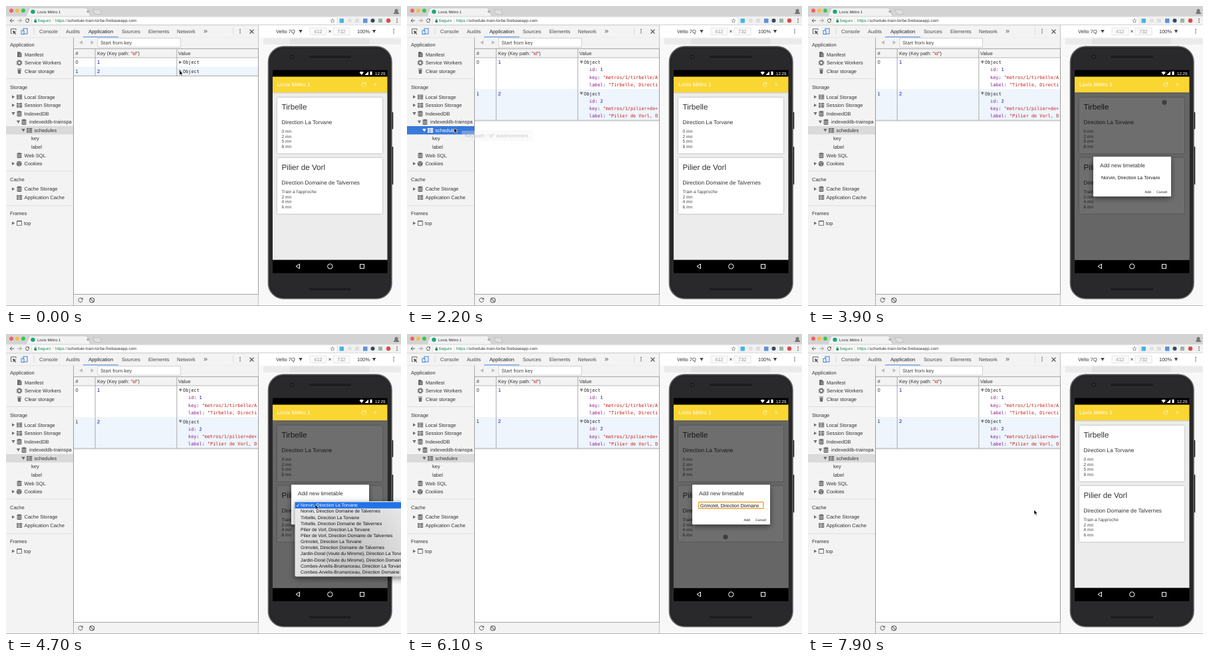
Recreate the animation shown at these times as an HTML page. Size 594 px wide and 452 px high, loop 8 s.

```html
<!DOCTYPE html>
<html lang="en">
<head>
<meta charset="utf-8">
<title>Timetable storage</title>
<style>
html,body{margin:0;width:100%;height:100%;overflow:hidden;background:#fff}
svg{display:block;width:100%;height:100%}
text{font-family:"Liberation Sans",Arial,sans-serif;white-space:pre;text-rendering:geometricPrecision}
.mono{font-family:"DejaVu Sans Mono",monospace}
.soft{filter:drop-shadow(0 .8px 1px rgba(0,0,0,.35))}
.deep{filter:drop-shadow(0 3px 4px rgba(0,0,0,.5))}
.a{animation:8s linear infinite}
.s{animation:8s step-end infinite}
.tri{transform-box:fill-box;transform-origin:center}
.open0{animation-name:open0}
.open1{animation-name:open1}
.row1{animation-name:row1}
.end{animation-name:end}
.pick{animation-name:pick}
.pickbg{animation-name:pickbg}
.tip{animation-name:tip}
.move{animation-name:move}
.arrow{animation-name:arrow}
.touch{animation-name:touch}
.press{animation-name:press}
.modal{animation-name:modal}
.focus{animation-name:focus}
.menu{animation-name:menu}
.old{animation-name:old}
.new{animation-name:new}
.hot{animation-name:hot}
@keyframes open0{0%{transform:none}11.25%,100%{transform:rotate(90deg)}}
@keyframes open1{0%{transform:none}1.25%,100%{transform:rotate(90deg)}}
@keyframes row1{0%{transform:none}11.25%,100%{transform:translateY(33.7px)}}
@keyframes end{0%{transform:none}1.25%{transform:translateY(33.7px)}11.25%,100%{transform:translateY(67.4px)}}
@keyframes pick{0%{color:#6e6e6e;fill:#333}26.25%{color:#fff;fill:#fff}35%,100%{color:#6e6e6e;fill:#333}}
@keyframes pickbg{0%{fill:#dadada}26.25%{fill:#3879d9}35%,100%{fill:#dadada}}
@keyframes tip{0%,22.5%{opacity:0}23.75%,26.25%{opacity:1}28.1%,100%{opacity:0}}
@keyframes move{
0%,5%{transform:translate(261px,97px)}
10%,15%{transform:translate(261px,84px)}
23.75%,28.75%{transform:translate(71px,184px)}
36.25%,37.5%{transform:translate(306px,307px)}
45%,47.5%{transform:translate(556px,119px)}
48.75%{transform:translate(536px,145px)}
53.75%,62.5%{transform:translate(465px,257px)}
67.5%,73.75%{transform:translate(462px,319px)}
81.25%,95%{transform:translate(512.5px,280px)}
98.75%,100%{transform:translate(340px,265px)}}
@keyframes arrow{0%{opacity:1}40.3%{opacity:0}58.75%{opacity:1}73.75%{opacity:0}97.4%,100%{opacity:1}}
@keyframes touch{0%{opacity:0}40.3%{opacity:1}58.75%{opacity:0}73.75%{opacity:1}97.4%,100%{opacity:0}}
@keyframes press{0%{opacity:0}45%{opacity:1}47.5%,100%{opacity:0}}
@keyframes modal{0%,47.2%{opacity:0}48.6%,93.7%{opacity:1}95%,100%{opacity:0}}
@keyframes focus{0%{opacity:0}58.75%{opacity:1}95%,100%{opacity:0}}
@keyframes menu{0%{opacity:0}58.75%{opacity:1}73.75%,100%{opacity:0}}
@keyframes old{0%{opacity:1}73.75%,100%{opacity:0}}
@keyframes new{0%{opacity:0}73.75%,100%{opacity:1}}
@keyframes hot{0%,62.5%{transform:none;animation-timing-function:steps(7)}67.5%,100%{transform:translateY(64.05px)}}
</style>
</head>
<body>
<script>
const rect = (x, y, w, h, fill, more = '') =>
  `<rect x="${x}" y="${y}" width="${w}" height="${h}" fill="${fill}" ${more}/>`;
const dot = (x, y, r, fill, more = '') => `<circle cx="${x}" cy="${y}" r="${r}" fill="${fill}" ${more}/>`;
const path = (d, fill, more = '') => `<path d="${d}" fill="${fill}" ${more}/>`;
const line = (d, color, w = 1) => `<path d="${d}" fill="none" stroke="${color}" stroke-width="${w}"/>`;
// y is the middle of the line of text
const text = (x, y, s, size = 7.5, fill = '#333', more = '') =>
  `<text x="${x}" y="${y + size * .355}" font-size="${size}" fill="${fill}" ${more}>${s}</text>`;
const group = (cls, body, more = '') => `<g class="${cls}" ${more}>${body}</g>`;
const at = (x, y, body) => `<g transform="translate(${x} ${y})">${body}</g>`;
const down = (x, y, c = '#6e6e6e') => path(`M${x - 2.7} ${y - 2.2}h5.4l-2.7 4.6z`, c);
const right = (x, y, c = '#6e6e6e', more = '') => path(`M${x - 2} ${y - 2.5}v5l4.2-2.5z`, c, more);
const reload = (x, y, c, r = 3) => at(x, y,
  line(`M${r * .8} ${-r * .6}A${r} ${r} 0 1 0 ${r} ${r * .2}`, c) +
  path(`M${r * 1.15} ${-r * 1.2}v${r}h${-r}z`, c));
const grid = (x, y, c = '#6e6e6e') => at(x, y,
  [-3.4, -.9, 1.6].map(v => rect(-4, v, 3.4, 1.9, c) + rect(0, v, 4.2, 1.9, c)).join(''));
const db = (x, y) => at(x, y,
  path('M-3.5-2.6a3.5 1.5 0 0 1 7 0v5.4a3.5 1.5 0 0 1-7 0z', '#6e6e6e') +
  line('M-3.5-1.8a3.5 1.4 0 0 0 7 0M-3.5.7a3.5 1.4 0 0 0 7 0', '#f3f3f3', .7));
const dots = (x, y) => [-2.6, 0, 2.6].map(d => dot(x, y + d, .8, '#555')).join('');

function browser() {
  let o = rect(0, 0, 594, 15, '#d3d3d3') + rect(0, 15, 594, 14, '#f1f1f1');
  ['#fc5b57', '#fdbc40', '#34c84a'].forEach((c, i) => o += dot(8 + i * 9, 7, 2.9, c));
  o += path('M30 15.2L35 4q.6-1 2-1h83q1.4 0 2 1l5 11.2z', '#f2f2f2', 'stroke="#b5b5b5" stroke-width=".5"');
  o += rect(0, 15, 594, .5, '#c4c4c4') + rect(31, 14.7, 95.5, 1, '#f2f2f2');
  o += path('M131 5.5h10l3 7h-10z', '#dedede', 'stroke="#aaa" stroke-width=".5"');
  o += dot(40.5, 8.6, 3.2, '#17a77a') + text(47, 8.6, 'Lovis Métro 1', 5.9);
  o += line('M121.5 7l3 3m0-3l-3 3', '#666', .8) + dot(587, 7, 2.6, '#777') + path('M583 12a4 3.5 0 0 1 8 0z', '#777');
  o += line('M12 22H6m2.7-2.7L6 22l2.7 2.7', '#555') + line('M17.5 22h6m-2.7-2.7l2.7 2.7-2.7 2.7', '#999');
  o += reload(32, 22, '#555', 2.6) + rect(39, 16.5, 459, 11.5, '#fff', 'rx="1.5" stroke="#ccc" stroke-width=".5"');
  o += rect(42.5, 21.5, 3.5, 3.2, '#0b8043') + line('M43.2 21.5v-1a1 1 0 0 1 2.1 0v1', '#0b8043', .7);
  o += text(47.5, 22, 'Seguro', 6.2, '#0b8043') + line('M70.5 18v8', '#ccc', .6);
  o += text(74, 22, '<tspan fill="#0b8043">https</tspan><tspan fill="#777">://</tspan>schedule-train-torbe.firebaseapp.com', 6.25);
  o += line('M491 19l.9 2.1 2.2.2-1.7 1.5.5 2.2-1.9-1.2-1.9 1.2.5-2.2-1.7-1.5 2.2-.2z', '#666', .6);
  o += rect(501.5, 19, 6.5, 6.5, '#45b5e5', 'rx="1"') + dot(517, 22, 3, '#e0e0e0') + rect(525, 19, 6, 6, '#dedede');
  o += rect(537, 19, 6.5, 6.5, '#5c93d8') + dot(551.5, 22, 3, '#34495e') + rect(560, 19, 6, 6, '#9bb5a6') + dot(575, 22, 3.2, '#d94b43');
  return o + dots(588, 22);
}

function tools() {
  let o = rect(0, 29, 380, 18, '#f3f3f3') + rect(0, 28.6, 594, .6, '#bbb') + rect(0, 47, 380, .7, '#c8c8c8');
  o += line('M9.5 41.5H7.5v-7h7.5v2', '#666') + path('M10 37l5.5 2-2.2 1 2 2.2-1 .8-2-2.2-1 1.9z', '#555');
  o += rect(26, 34, 6, 8, 'none', 'stroke="#3b7ddd"') + rect(23, 37, 4, 5.5, '#f3f3f3', 'stroke="#3b7ddd"');
  o += line('M42 33v10', '#ccc', .7);
  const tabs = { Console: 50, Audits: 90, Application: 124, Sources: 174, Elements: 214, Network: 257 };
  for (const t in tabs) o += text(tabs[t], 38.3, t, 7.6, t === 'Application' ? '#222' : '#4a4a4a');
  o += rect(116, 46.2, 53, 1.3, '#3b7ddd') + text(297, 37.5, '»', 11, '#555') + dots(352, 38);
  return o + line('M341.5 33v10', '#ccc', .6) + line('M366.5 35.5l6 6m0-6l-6 6', '#555', 1.1);
}

function sidebar() {
  let o = rect(0, 47.5, 102, 404, '#f3f3f3');
  [109, 248.5, 300.5].forEach(y => o += rect(0, y, 101, .7, '#d4d4d4'));
  const items = [[6, 58.5, 'Application'], [28, 73, 'Manifest'], [28, 85.5, 'Service Workers'], [28, 98.3, 'Clear storage'],
    [6, 122.5, 'Storage'], [27.5, 137, 'Local Storage'], [27.5, 149.6, 'Session Storage'], [27.5, 162.2, 'IndexedDB'],
    [35, 174.7, 'indexeddb-trainspa'], [38, 199.8, 'key'], [38, 212.4, 'label'], [27.5, 225, 'Web SQL'],
    [27.5, 237.6, 'Cookies'], [6, 261.2, 'Cache'], [27.5, 275.7, 'Cache Storage'], [27.5, 288.3, 'Application Cache'],
    [6, 312.5, 'Frames'], [27, 327.2, 'top']];
  items.forEach(([x, y, s]) => o += text(x, y, s));
  o += path('M17 69h4l2.5 2.5V77H17z', '#6e6e6e') + line('M20 73h2M20 75h2', '#f3f3f3', .5);
  o += dot(20, 85.5, 2.6, 'none', 'stroke="#6e6e6e" stroke-width="1.6"') +
    dot(20, 85.5, 3.9, 'none', 'stroke="#6e6e6e" stroke-width="1.2" stroke-dasharray="1.5 1.56"');
  o += path('M17.5 96h5l-.5 6h-4zM17 94.3h6v1h-6z', '#6e6e6e');
  [137, 149.6, 288.3].forEach(y => o += grid(20, y));
  [[20, 162.2], [27, 174.7], [20, 225], [20, 275.7]].forEach(p => o += db(...p));
  [137, 149.6, 237.6, 275.7, 327.2].forEach(y => o += right(11, y));
  o += down(11, 162.2) + down(18.5, 174.7);
  o += dot(19.7, 237.6, 3.9, '#6e6e6e') + dot(18, 236.5, .8, '#f3f3f3') + dot(21, 236, .7, '#f3f3f3') + dot(20, 239.5, .8, '#f3f3f3');
  o += rect(16.5, 324, 7, 6.5, 'none', 'stroke="#6e6e6e" stroke-width=".9"') + rect(16.5, 323.5, 7, 1.5, '#6e6e6e');
  o += rect(0, 181, 101.5, 12.5, '#dadada', 'class="s pickbg"');
  return o + group('s pick', down(26, 187.3, 'currentColor') + grid(35, 187.3, 'currentColor') + text(42.5, 187.3, 'schedules', 7.5, 'inherit'));
}

const mono = (x, y, s) => text(x, y, s, 6.87, '#222', 'class="mono"');
function record(n, key, label) {
  const field = (k, v, c) => `<tspan fill="#881391">${k}</tspan>: <tspan fill="${c}">${v}</tspan>`;
  return text(104.5, 6.6, n) + text(137, 6.6, n + 1, 7.5, '#1c00cf') +
    right(262.2, 6.8, '#6e6e6e', `class="tri s open${n}"`) + mono(266, 6.8, 'Object') +
    mono(274, 18, field('id', n + 1, '#1c00cf')) +
    mono(274, 29.3, field('key', '"metros/1/' + key, '#c41a16')) +
    mono(274, 40.6, field('label', '"' + label, '#c41a16'));
}

function table() {
  const cols = h => rect(133.6, 0, 1, h, '#aaa') + rect(256.4, 0, 1, h, '#aaa');
  let o = rect(101.5, 47.5, 279, 404, '#fff');
  o += at(0, 78, cols(48) + record(0, 'tirbelle/A', 'Tirbelle, Directi'));
  o += at(0, 91.3, group('s row1', rect(101.5, 0, 278, 48, '#eef5fd') + cols(48) + record(1, 'pilier+de+', 'Pilier de Vorl, D')));
  o += group('s end', rect(101.5, 105.2, 278, 400, '#fff') + rect(101.5, 104.8, 278, .9, '#999'));
  o += rect(101.5, 47.7, 278, 16.5, '#f3f3f3') + rect(138, 48.5, 124.5, 13.5, '#fff', 'stroke="#c4c4c4" stroke-width=".7"');
  o += path('M115 52v6l-5-3z', '#bbb') + path('M127.5 52v6l5-3z', '#bbb') + text(142, 55.3, 'Start from key', 7.6, '#444');
  o += rect(101.5, 64.5, 278, 13.5, '#f3f3f3') + at(0, 64.5, cols(13.5)) + rect(101.5, 77.5, 278, .8, '#aaa');
  o += text(104.5, 71.3, '#') + text(137, 71.3, 'Key (Key path: "<tspan fill="#c41a16">id</tspan>")', 7.4) + text(259, 71.3, 'Value');
  o += rect(101.5, 434, 278, 18, '#f3f3f3') + reload(112, 443, '#555', 3.2);
  o += line('M126.8 440.8l4.8 4.8', '#555', 1.1) + dot(129.2, 443.2, 3.5, 'none', 'stroke="#555" stroke-width="1.1"');
  return o + rect(101, 47.5, .8, 404, '#999');
}

function card(y, title, way, waits) {
  return group('soft', rect(408, y, 158, 84, '#fff', 'rx="1"')) +
    text(414.5, y + 14.3, title, 11.7) + text(414.5, y + 36.8, way, 8.3) +
    waits.map((s, i) => text(414.5, y + 51 + i * 7.5, s, 6.6, '#444')).join('');
}

function phone() {
  let o = rect(379.5, 29, 215, 423, '#f8f8f8') + rect(380, 29, 214, 18, '#fff') + rect(379, 29, 1, 423, '#c4c4c4');
  o += rect(101.5, 64.3, 278, 370, 'none', 'stroke="#999" stroke-width=".9"');
  o += rect(387, 48.5, 207, 9.5, '#ebebeb') + rect(427, 48.5, 119, 9.5, '#e2e2e2');
  o += text(406, 38.3, 'Velto 7Q') + down(443, 38.3, '#444');
  [[457, 412], [492, 732]].forEach(([x, n]) => o += rect(x, 33, 25, 10.5, '#fafafa', 'stroke="#ddd" stroke-width=".7"') + text(x + 6, 38.3, n, 7.5, '#999'));
  o += text(484.5, 38.3, '×', 8.5) + text(528, 38.3, '100%') + down(553.5, 38.3, '#444') + dots(583, 38);
  o += rect(579.5, 160, 2.8, 25.5, '#222', 'rx=".8"') + rect(579.5, 212, 2.8, 57, '#222', 'rx=".8"');
  o += rect(394.5, 61, 185.5, 380, '#29292b', 'rx="23" stroke="#646467" stroke-width="1.6"');
  o += rect(397, 63.5, 180.5, 375, 'none', 'rx="21" stroke="#232325"');
  o += dot(429.5, 76.5, 3, '#1a1a1c') + dot(429.5, 76.5, 1.3, '#3d3d48');
  [76.5, 426.5].forEach(y => o += rect(454, y - 2.7, 66, 5.4, '#1d1d1f', 'rx="2.7" stroke="#3b3b3d" stroke-width=".6"'));
  o += rect(401, 96.5, 172.5, 306, '#000') + rect(401, 130, 172.5, 252.5, '#ececec');
  o += card(138, 'Tirbelle', 'Direction La Torvane', ['0 mn', '2 mn', '5 mn', '8 mn']);
  o += card(229, 'Pilier de Vorl', 'Direction Domaine de Talvernes', ["Train a l'approche", '2 mn', '4 mn', '6 mn']);
  o += dialog();
  o += group('soft', rect(401, 106.5, 172.5, 23.7, '#fad633'));
  o += text(408, 118.3, 'Lovis Métro 1', 8.25, '#fff') + reload(538, 118.3, '#fff3b8', 2.9) + line('M555.3 115.8v5m-2.5-2.5h5', '#fff3b8', .8);
  o += group('s press', dot(556, 119, 6.6, '#b4b98a', 'opacity=".75"'));
  o += path('M531.5 100q3.2-2.4 6.4 0l-3.2 4z', '#fff') + path('M545 98.5v5.5h-5.5z', '#fff') + rect(547.5, 99, 3, 5, '#fff') + rect(548.3, 98.3, 1.4, 1, '#fff');
  o += text(555, 101.5, '12:29', 6.2, '#fff');
  return o + line('M441.5 388.7v7l-5.5-3.5z', '#fff') + dot(487.3, 392.3, 3.7, 'none', 'stroke="#fff"') + rect(532.5, 389.3, 6, 6, 'none', 'stroke="#fff"');
}

function dialog() {
  const value = (cls, s) => group('s ' + cls, text(441, 258, s, 7.1, '#111'), 'clip-path="url(#field)"');
  return group('a modal', rect(401, 130, 172.5, 252.5, '#000', 'opacity=".57"') +
    group('deep', rect(429, 227, 117, 60, '#fff', 'rx="1"')) + text(439, 240, 'Add new timetable', 8.25) +
    value('old', 'Norvin, Direction La Torvane') + value('new', 'Grimolet, Direction Domaine de Talvernes') +
    group('s focus', rect(438.5, 253.3, 97.5, 9.5, 'none', 'stroke="#eda83c" stroke-width="1.5" rx=".8"')) +
    text(506.5, 280.2, 'Add', 5.3, '#222') + text(524, 280.2, 'Cancel', 5.2, '#222'));
}

const bar = rect(434.5, 253.3, 170, 9.5, '#2272e8', 'class="a hot"');
function menu() {
  const stops = ['Norvin', 'Tirbelle', 'Pilier de Vorl', 'Grimolet', 'Jardin-Doral (Voute du Mirome)', 'Combes-Arvelis-Brumanceau'];
  const list = stops.flatMap(s => ['La Torvane', 'Domaine de Talvernes'].map(w => s + ', Direction ' + w));
  const items = c => list.map((s, i) => text(443, 257.8 + i * 9.15, s, 6.82, c)).join('') +
    line('M437 258l1.5 2 2.3-4.5', c, .9);
  return group('s menu', group('deep', rect(434.5, 252, 170, 113.5, 'url(#frost)', 'rx="2"')) + items('#111') +
    bar + `<g clip-path="url(#hot)">${items('#fff')}</g>`);
}

function tip() {
  return group('a tip', rect(82.5, 188, 107, 14, '#f3f3f3', 'stroke="#d0d0d0" stroke-width=".6"') +
    text(87, 195.2, 'Key path: "id" autoIncrement', 7.5, '#555'));
}

function pointer() {
  return group('a move', group('s arrow', path('M0 0v7l1.7-1.4 1.2 2.6 1.2-.5-1.2-2.6h2.2z', '#000', 'stroke="#fff" stroke-width=".5"')) +
    group('s touch', dot(0, 0, 4.2, '#333', 'fill-opacity=".8" stroke="#999" stroke-opacity=".6" stroke-width=".8"')));
}

document.body.innerHTML = `<svg viewBox="0 0 594 452"><defs>
<radialGradient id="frost" gradientUnits="userSpaceOnUse" cx="525" cy="335" r="110">
<stop offset=".2" stop-color="#cbcbcb"/><stop offset="1" stop-color="#ebebeb"/></radialGradient>
<clipPath id="field">${rect(439, 253, 90, 10, '#000')}</clipPath>
<clipPath id="hot">${bar}</clipPath></defs>` +
  browser() + tools() + sidebar() + table() + phone() + rect(0, 451, 594, 1, '#b5b5b5') + menu() + tip() + pointer() + '</svg>';
</script>
</body>
</html>
```
